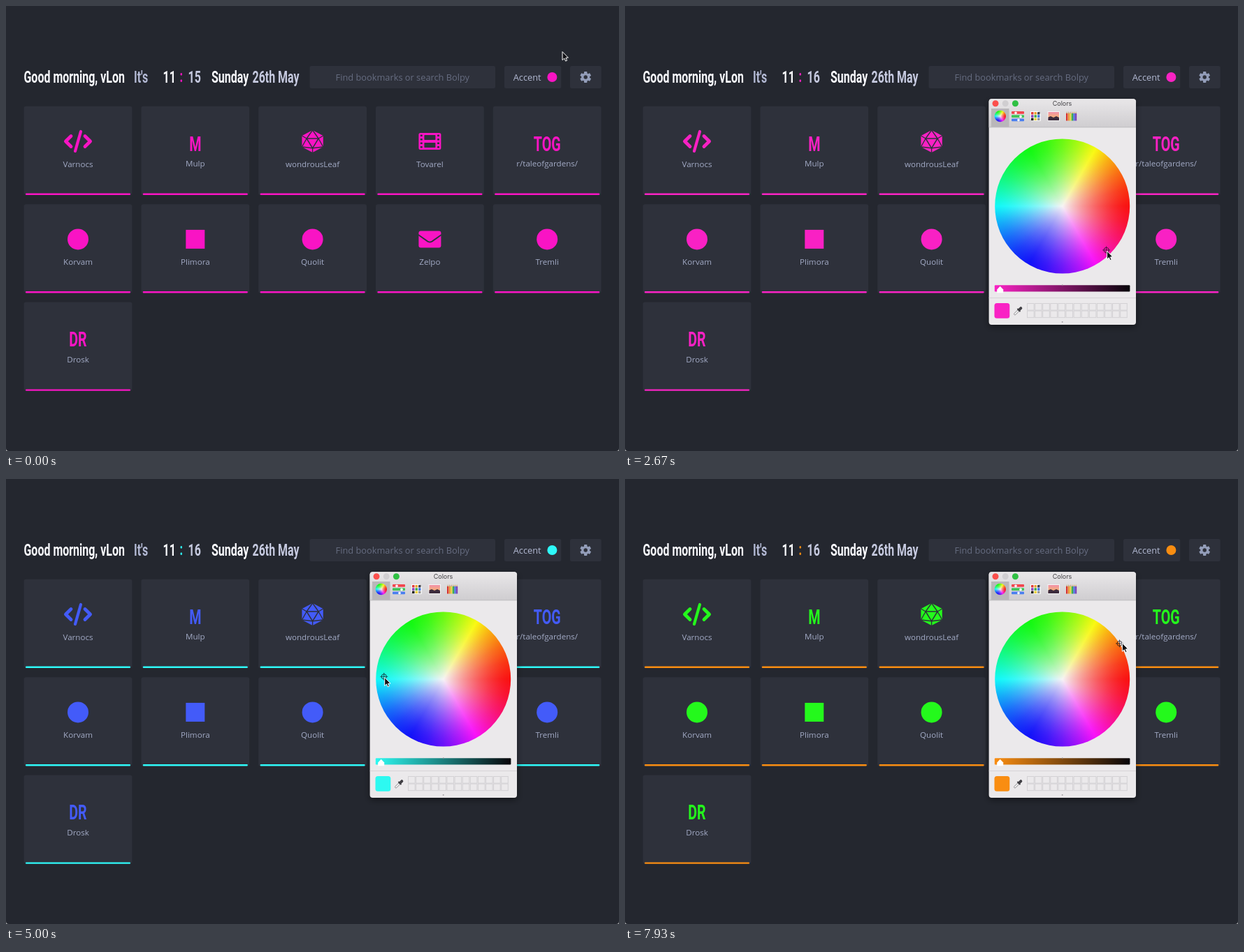
These frames come from a looping animation (877 px wide and 638 px high, 8 s). An HTML page with a canvas:

```html
<!DOCTYPE html>
<html lang="en">
<head>
<meta charset="utf-8">
<title>Start page accent colour</title>
<style>
html, body { margin: 0; width: 100%; height: 100%; overflow: hidden; background: #24272f; }
canvas { display: block; }
</style>
</head>
<body>
<canvas id="stage" width="877" height="638"></canvas>
<script>
const ctx = document.getElementById('stage').getContext('2d');
const LOOP = 8000, TAU = Math.PI * 2;
const BG = '#24272f', CARD = '#2e313b', WHITE = '#fafbff', SOFT = '#c6cae0', LABEL = '#a3abc6';
const WHEEL = { x: 625.7, y: 287, r: 96.5 };
const PICKER_OPEN = 850, MINUTE = 1300, GRAB = 2450;

// [time, x, y] before the drag; [time, angle, radius] on the wheel during it
const APPROACH = [[120, 796, 65.5], [520, 782, 100], [950, 782, 100], [1700, 671, 358], [2000, 671, 358], [2350, 689, 350]];
const DRAG = [[2950, 45, 89], [3650, 128, 76], [4200, 128, 76], [4900, 182.5, 85], [5500, 182.5, 85],
  [6200, 242, 92], [6950, 242, 92], [7700, 328, 100]];
const SETTLED = [2500, 3800, 5100, 6350];

const TILES = [
  ['Varnocs', 'code'], ['Mulp', 'M'], ['wondrousLeaf', 'dice'], ['Tovarel', 'film'], ['r/taleofgardens/', 'TOG'],
  ['Korvam', 'disc'], ['Plimora', 'square'], ['Quolit', 'disc'], ['Zelpo', 'mail'], ['Tremli', 'disc'],
  ['Drosk', 'DR']
];

// ---- motion and colour ----
const mix = (a, b, k) => a.map((v, i) => v + (b[i] - v) * k);
const clamp = v => Math.min(1, Math.max(0, v));
const ease = k => 0.5 - Math.cos(Math.PI * clamp(k)) / 2;
const rgb = c => `rgb(${c.map(Math.round).join(',')})`;

// Hue runs 0..6; gamma above 1 widens the primaries
function hueColor(hue, sat, gamma = 1) {
  return [5, 3, 1].map(n => {
    const k = (n + hue) % 6;
    return 249 * (1 - sat * (1 - (1 - clamp(Math.min(k, 4 - k))) ** gamma));
  });
}

function along(keys, t) {
  const next = keys.findIndex(k => k[0] > t);
  if (next === 0) return keys[0].slice(1);
  if (next < 0) return keys[keys.length - 1].slice(1);
  const a = keys[next - 1], b = keys[next];
  return mix(a.slice(1), b.slice(1), ease((t - a[0]) / (b[0] - a[0])));
}

const polar = (deg, r) => [WHEEL.x + r * Math.cos(deg * TAU / 360), WHEEL.y + r * Math.sin(deg * TAU / 360)];
const wheelPos = t => t < GRAB ? [46, 95.5] : along(DRAG, t);

function cursorPos(t) {
  if (t < GRAB) return along(APPROACH, t);
  const [x, y] = polar(...along(DRAG, t));
  return [x + 0.9, y + 1.2];
}

function accentAt(t) {
  const [deg, r] = wheelPos(t);
  return hueColor((360 - deg) / 60, Math.min(1, r / WHEEL.r) * 0.93);
}

// Icons only change once the drag has come to rest
function iconColor(t) {
  return SETTLED.reduce((c, s) => mix(c, accentAt(s), clamp((t - s) / 200)), accentAt(0));
}

// ---- drawing helpers ----
function box(x, y, w, h, r, fill) {
  ctx.beginPath();
  ctx.roundRect(x, y, w, h, r);
  ctx.fillStyle = fill;
  ctx.fill();
}

function disc(x, y, r, fill) {
  ctx.beginPath();
  ctx.arc(x, y, r, 0, TAU);
  ctx.fillStyle = fill;
  ctx.fill();
}

function trace(points, close) {
  ctx.beginPath();
  points.forEach(p => ctx.lineTo(...p));
  if (close) ctx.closePath();
}

function line(points, color, width) {
  trace(points);
  ctx.strokeStyle = color;
  ctx.lineWidth = width;
  ctx.stroke();
}

function poly(points, fill) {
  trace(points, true);
  ctx.fillStyle = fill;
  ctx.fill();
}

function text(str, x, y, size, color, align = 'left', family = '"Open Sans", sans-serif') {
  ctx.font = `${size}px ${family}`;
  ctx.textAlign = align;
  ctx.fillStyle = color;
  ctx.fillText(str, x, y);
}

// Narrow display face
function head(str, x, y, color, size = 24, align = 'left') {
  ctx.save();
  ctx.translate(x, y);
  ctx.scale(0.665, 1);
  text(str, 0, 0, `bold ${size}`, color, align, 'Roboto, sans-serif');
  ctx.restore();
}

// ---- tile icons, centred on 0,0 ----
const ICONS = {
  code(c) {
    ctx.lineCap = ctx.lineJoin = 'round';
    for (const s of [-1, 1]) line([[s * 10, -7.5], [s * 17.6, 0], [s * 10, 7.5]], c, 4.8);
    line([[4, -14], [-4, 14]], c, 4.2);
    ctx.lineCap = 'butt';
    ctx.lineJoin = 'miter';
  },
  dice(c) {
    const hex = [...Array(6).keys()].map(i => [17.5 * Math.sin(i * TAU / 6), -16 * Math.cos(i * TAU / 6)]);
    const a = [-8.5, -4], b = [8.5, -4], d = [0, 9.8];
    poly(hex, c);
    line([a, b, d, a, b], CARD, 1.5);
    [[a, 0], [a, 5], [a, 4], [b, 0], [b, 1], [b, 2], [d, 3], [d, 2], [d, 4]]
      .forEach(([p, i]) => line([p, hex[i]], CARD, 1.4));
  },
  film(c) {
    box(-16, -12, 32, 24, 2.5, c);
    for (const y of [-9, 2]) box(-8, y, 16, 7, 0.8, CARD);
    for (let i = 0; i < 4; i++)
      for (const x of [-13.6, 10.6]) box(x, -9.5 + i * 5.5, 3, 2.6, 0.6, CARD);
  },
  mail(c) {
    box(-16, -12, 32, 24, 3, c);
    line([[-16.5, -6.5], [-3, 3.2], [0, 4.2], [3, 3.2], [16.5, -6.5]], CARD, 1.8);
  },
  disc(c) { disc(0, 0, 15, c); },
  square(c) { box(-13.5, -13.5, 27, 27, 0, c); }
};

function gear(x, y, color) {
  ctx.save();
  ctx.translate(x, y);
  for (let i = 0; i < 6; i++) {
    box(-2.2, -8, 4.4, 8, 0.8, color);
    ctx.rotate(TAU / 6);
  }
  disc(0, 0, 6, color);
  disc(0, 0, 2.7, CARD);
  ctx.restore();
}

function header(t, accent) {
  const y = 109.6;
  head('Good morning, vLon', 25.5, y, WHITE);
  head("It's", 183, y, '#b3b9d4');
  head('11', 224.5, y, WHITE);
  head(':', 248.5, y - 0.5, accent);
  head(t < MINUTE ? '15' : '16', 260.5, y, SOFT);
  head('Sunday', 294, y, WHITE);
  head('26th May', 352.5, y, SOFT);

  box(434.5, 86, 265.5, 32, 2.5, CARD);
  text('Find bookmarks or search Bolpy', 567.3, 106.6, 12.8, '#666c80', 'center');
  box(713, 86, 81.3, 32, 2.5, CARD);
  text('Accent', 725.7, 106.6, 12.8, '#b3bad3');
  disc(781.4, 102, 7, accent);
  box(807, 86, 44.7, 32, 2.5, CARD);
  gear(829.2, 102, '#939db9');
}

function tiles(icon, accent) {
  TILES.forEach(([label, kind], i) => {
    const x = 25.6 + (i % 5) * 167.8, y = 143.8 + Math.floor(i / 5) * 140.4, mid = x + 77.4;
    box(x, y, 154.8, 127.2, 3, CARD);
    box(x + 2.4, y + 124.8, 150, 2.4, 1, accent);
    if (ICONS[kind]) {
      ctx.save();
      ctx.translate(mid, y + 50.2);
      ICONS[kind](icon);
      ctx.restore();
    } else {
      head(kind, mid, y + 63.8, icon, 29.6, 'center');
    }
    text(label, mid, y + (ICONS[kind] ? 86.8 : 86), 11.6, LABEL, 'center');
  });
}

// ---- colour picker ----
function wheel(x, y, r) {
  const hue = ctx.createConicGradient(0, x, y);
  const fade = ctx.createRadialGradient(x, y, 0, x, y, r);
  for (let i = 0; i <= 24; i++) {
    hue.addColorStop(i / 24, rgb(hueColor(6 - i / 4, 0.93, 1.4)));
    fade.addColorStop(i / 24, `rgba(246,244,246,${(1 - i / 24) ** 1.5})`);
  }
  disc(x, y, r, hue);
  disc(x, y, r, fade);
}

function toolbar() {
  box(524, 147, 25.5, 26.5, 0, '#b9b7ba');
  wheel(536.8, 158, 8.2);

  ['#f2444c', '#41c45a', '#4a7ff0'].forEach((c, i) => {
    const y = 151 + i * 5.2;
    box(553, y, 18, 3.8, 1, c);
    disc([559, 566, 563][i], y + 2.2, 1.8, '#fff');
  });

  box(580, 151, 12, 12, 1, '#fff');
  box(584, 154, 11, 11, 1, '#f6f6f6');
  const dabs = ['#e03a3a', '#f0a030', '#44434a', '#8b3fc0', '#3fae4c', '#3c74e8', '#222', '#eed23c', '#999'];
  dabs.forEach((c, i) => box(581 + (i % 3) * 4.5, 152 + Math.floor(i / 3) * 4.3, 3.5, 3.4, 0.5, c));

  box(604.5, 151, 17.5, 14, 0, '#f5f5f5');
  const sky = ctx.createLinearGradient(0, 152, 0, 164);
  sky.addColorStop(0, '#f08fa8');
  sky.addColorStop(0.6, '#f6b07c');
  sky.addColorStop(1, '#7b4b68');
  box(605.5, 152, 15.5, 12, 0, sky);
  poly([[605.5, 164], [605.5, 159.5], [609, 158], [613, 160], [617, 158], [621, 160], [621, 164]], '#3c2b3d');

  ['#d83030', '#ef8a2c', '#e8d23a', '#3cae48', '#3867dd', '#7a3fb8'].forEach((c, i) => {
    const x = 631 + i * 2.6;
    box(x, 154, 2.2, 10.5, 0, c);
    poly([[x, 154], [x + 1.1, 151], [x + 2.2, 154]], '#c9a77c');
  });
}

function crosshair(x, y) {
  const ink = 'rgba(20,20,30,.75)';
  ctx.beginPath();
  ctx.arc(x, y, 3.6, 0, TAU);
  ctx.strokeStyle = ink;
  ctx.lineWidth = 1;
  ctx.stroke();
  line([[x - 5.5, y], [x + 5.5, y]], ink, 0.9);
  line([[x, y - 5.5], [x, y + 5.5]], ink, 0.9);
}

function eyedropper(x, y) {
  ctx.save();
  ctx.translate(x, y);
  ctx.rotate(TAU / 8);
  box(-1.3, -1, 2.6, 8, 1, '#f4f4f4');
  ctx.strokeStyle = '#77757a';
  ctx.lineWidth = 0.8;
  ctx.stroke();
  box(-3, -3, 6, 2, 0.8, '#3f3e43');
  box(-1.9, -8, 3.8, 6, 1.7, '#3f3e43');
  ctx.restore();
}

function picker(t) {
  const color = rgb(accentAt(t));
  ctx.save();
  ctx.shadowColor = 'rgba(0,0,0,.45)';
  ctx.shadowBlur = 10;
  ctx.shadowOffsetY = 3;
  box(520.6, 133.3, 210.4, 323.7, 4, '#ebe9eb');
  ctx.restore();

  const bar = ctx.createLinearGradient(0, 133, 0, 174);
  bar.addColorStop(0, '#e9e7e9');
  bar.addColorStop(1, '#cfcdd0');
  box(520.6, 133.3, 210.4, 40.4, [4, 4, 0, 0], bar);
  box(520.6, 173.4, 210.4, 0.8, 0, '#b4b2b5');
  ['#fb4f4c', '#d0ced1', '#2fc043'].forEach((c, i) => disc(530 + i * 14.2, 139.8, 4.5, c));
  text('Colors', 625.5, 143.2, 9, '#434246', 'center', 'Inter, sans-serif');
  toolbar();
  wheel(WHEEL.x, WHEEL.y, WHEEL.r);

  const ramp = ctx.createLinearGradient(529, 0, 722, 0);
  ramp.addColorStop(0, color);
  ramp.addColorStop(1, '#08060a');
  box(528.8, 400.3, 193.6, 9.2, 1, ramp);
  box(625.3, 399.3, 1, 2, 0, '#8d8b8e');
  poly([[536.7, 401.8], [541.2, 406.5], [541.2, 411.3], [532.2, 411.3], [532.2, 406.5]], '#fff');
  box(520.6, 418, 210.4, 0.8, 0, '#d0ced0');

  box(528.5, 426, 21.8, 21.8, 3.5, color);
  if (t < GRAB) poly([[543.5, 426], [548, 426], [550.3, 428.3], [550.3, 433]], '#8e8c90');
  eyedropper(562, 437.5);
  ctx.strokeStyle = '#d3d1d4';
  ctx.lineWidth = 1;
  for (let i = 0; i < 26; i++)
    ctx.strokeRect(575.5 + (i % 13) * 11.1, 426.5 + Math.floor(i / 13) * 10.6, 9.6, 9.6);
  disc(625.7, 453, 1, '#a5a3a6');

  const [deg, r] = wheelPos(t);
  crosshair(...polar(deg, Math.min(r, WHEEL.r)));
}

function cursor(x, y) {
  ctx.save();
  ctx.translate(x, y);
  poly([[0, 0], [0, 12], [2.8, 9.5], [4.6, 13.5], [6.6, 12.6], [4.9, 8.8], [8.4, 8.6]], '#121216');
  ctx.strokeStyle = '#fff';
  ctx.lineWidth = 1;
  ctx.stroke();
  ctx.restore();
}

function draw(t) {
  const accent = rgb(accentAt(t - 200));
  ctx.fillStyle = '#a9aaae';
  ctx.fillRect(0, 0, 877, 638);
  box(0, 0, 877, 638, [0, 0, 4, 4], BG);
  header(t, accent);
  tiles(rgb(iconColor(t)), accent);
  if (t >= PICKER_OPEN) picker(t);
  cursor(...cursorPos(t));
}

const start = performance.now();
function tick() {
  draw((performance.now() - start) % LOOP);
  requestAnimationFrame(tick);
}
tick();
</script>
</body>
</html>
```
